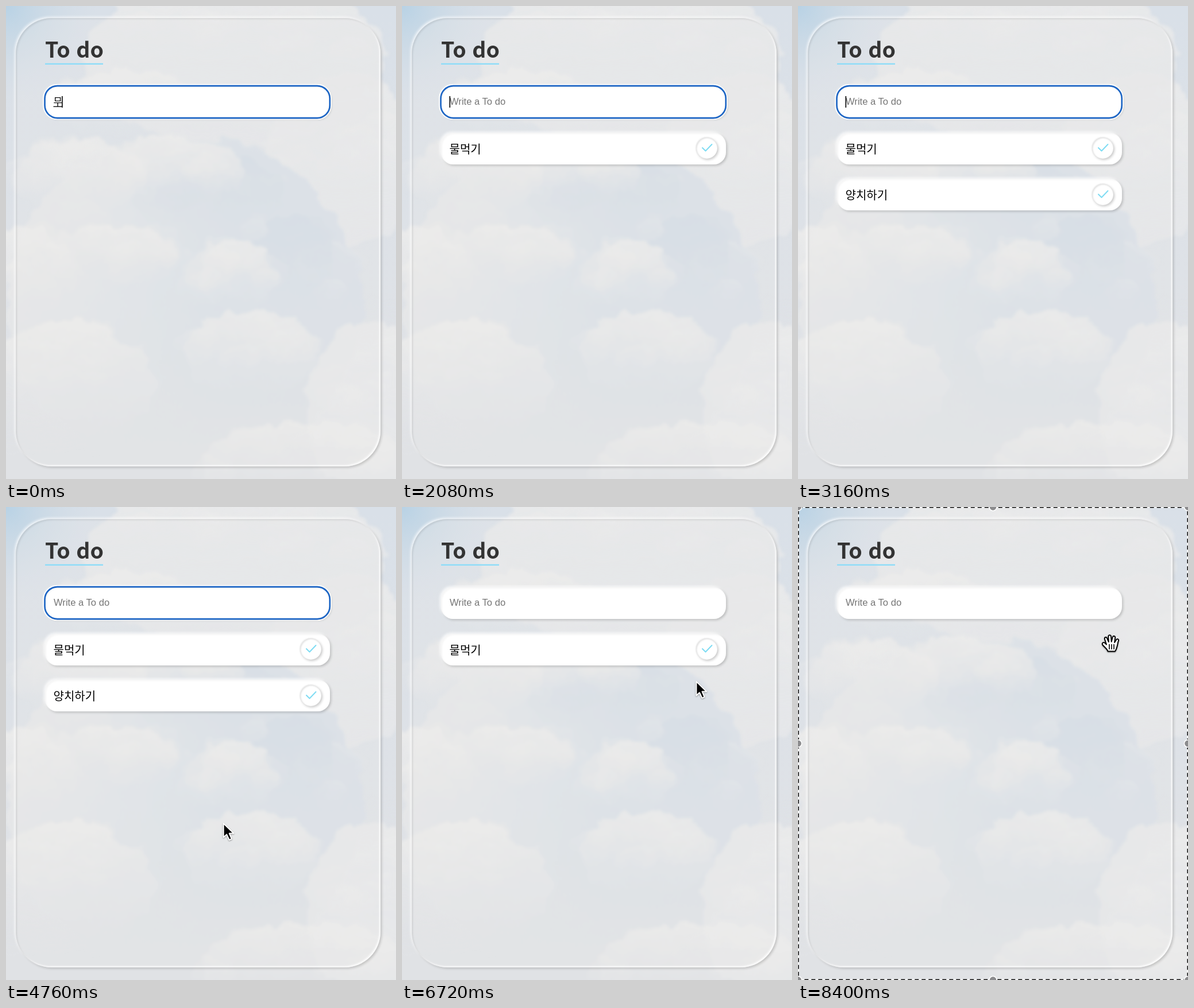
An HTML page that plays this animation: 679x824 px, repeating every 8590 ms.

```html
<!DOCTYPE html>
<html lang="ko">
<head>
<meta charset="utf-8">
<title>To do</title>
<style>
html, body { margin: 0; width: 100%; height: 100%; overflow: hidden; background: #dfe3e8; }
#stage { position: absolute; left: 0; top: 0; width: 679px; height: 824px; overflow: hidden; }
#stage > svg { position: absolute; left: 0; top: 0; }
#sky { will-change: transform; }
.box { position: absolute; box-sizing: border-box; }
.card {
  left: 17px; top: 21px; width: 635px; height: 781px; border-radius: 62px;
  background: rgba(230, 230, 230, .3);
  box-shadow: -2px -2px 4px rgba(255,255,255,.75), 2px 2px 4px rgba(0,0,0,.2),
    inset 2px 2px 3px rgba(0,0,0,.09), inset -2px -2px 3px rgba(255,255,255,.85);
}
.field {
  left: 68px; width: 496px; height: 55px; border-radius: 21px; background: #fff;
  box-shadow: -2px -2px 4px rgba(255,255,255,.8), 2px 2px 4px rgba(0,0,0,.2),
    inset 2px 2px 3px rgba(0,0,0,.04);
}
.item { padding-left: 14.5px; font: 500 20px/55px "Noto Sans CJK KR", "Noto Sans CJK", sans-serif; color: #000; }
.done {
  left: 444px; top: 8.5px; width: 37px; height: 37px; border-radius: 50%; background: #fff;
  box-shadow: 2px 2px 4px rgba(0,0,0,.22), -1px -1px 2px rgba(0,0,0,.06), inset 1px 1px 3px rgba(0,0,0,.14);
}
.done svg { position: absolute; left: 0; top: 0; stroke: #7fdcf3; }
.done.hover {
  left: 442px; top: 6.5px; width: 41px; height: 41px; background: #4bb9ec;
  box-shadow: inset 2px 2px 5px rgba(0,40,80,.3), 1px 1px 2px rgba(0,0,0,.08);
}
.done.hover svg { left: 2px; top: 2px; stroke: #fff; }
.ko { font-family: "Noto Sans CJK KR", "Noto Sans CJK", sans-serif; }
.latin { font-family: "Liberation Sans", Arial, sans-serif; }
</style>
</head>
<body>
<div id="stage">
  <svg id="sky" width="679" height="824">
    <defs>
      <filter id="puffy" filterUnits="userSpaceOnUse" x="-40" y="-40" width="760" height="910" color-interpolation-filters="sRGB">
        <feTurbulence type="fractalNoise" baseFrequency=".028" numOctaves="4" seed="8" result="n"/>
        <feDisplacementMap in="SourceGraphic" in2="n" scale="34" xChannelSelector="R" yChannelSelector="G"/>
        <feGaussianBlur stdDeviation="2.4"/>
      </filter>
      <linearGradient id="air" x2="0" y2="1">
        <stop offset="0" stop-color="#d9e0e8"/><stop offset="1" stop-color="#e2e3e6"/>
      </linearGradient>
      <radialGradient id="blue" gradientUnits="userSpaceOnUse" cx="0" cy="0" r="170">
        <stop offset="0" stop-color="#b8d2e5"/><stop offset=".4" stop-color="#c5d7e5" stop-opacity=".65"/>
        <stop offset="1" stop-color="#d6dfe8" stop-opacity="0"/>
      </radialGradient>
      <linearGradient id="lit" x2="0" y2="1">
        <stop offset="0" stop-color="#efeeec" stop-opacity=".8"/><stop offset="1" stop-color="#e6e7e9" stop-opacity="0"/>
      </linearGradient>
      <linearGradient id="full" x2="0" y2="1">
        <stop offset="0" stop-color="#e8e9ea"/><stop offset="1" stop-color="#e7e8ea" stop-opacity=".75"/>
      </linearGradient>
      <linearGradient id="shade" x2="0" y2="1">
        <stop offset="0" stop-color="#cfd9e4" stop-opacity=".75"/><stop offset="1" stop-color="#d5dde6" stop-opacity="0"/>
      </linearGradient>
      <linearGradient id="dome" x2="1" y2=".1">
        <stop offset="0" stop-color="#e8e8e8"/><stop offset=".35" stop-color="#e0e4e8"/>
        <stop offset=".65" stop-color="#d7dfe7"/><stop offset="1" stop-color="#d7dee7"/>
      </linearGradient>
      <linearGradient id="haze" x2="0" y2="1">
        <stop offset="0" stop-color="#dde1e6" stop-opacity="0"/><stop offset=".7" stop-color="#e0e2e5"/>
      </linearGradient>
    </defs>
    <rect width="679" height="824" fill="url(#air)"/>
    <rect width="300" height="300" fill="url(#blue)"/>
    <g id="clouds" filter="url(#puffy)"></g>
  </svg>

  <div class="box card"></div>
  <div class="box field" style="top:140px"></div>

  <svg id="ui" width="679" height="824">
    <text class="ko" x="68" y="89.7" font-size="37.5" font-weight="700" fill="#333">To do</text>
    <rect x="68" y="99.7" width="101" height="2.4" fill="#8ddcf8"/>
    <g id="ring" fill="none">
      <rect x="65.3" y="136.9" width="500.6" height="60.4" rx="24" stroke="#fff" stroke-opacity=".85" stroke-width="2"/>
      <rect x="67.5" y="139.1" width="496.3" height="56" rx="22" stroke="#1b64c4" stroke-width="2.6"/>
    </g>
    <text id="hint" class="latin" x="83" y="172.3" font-size="16.6" fill="#757575">Write a To do</text>
    <text id="typed" class="ko" x="82.5" y="173" font-size="16.67"></text>
    <rect id="compose" y="174.6" width="15.3" height="1.3"/>
    <rect id="caret" y="157" width="1.6" height="20"/>

    <g id="popup" style="filter:drop-shadow(0 1px 2px rgba(0,0,0,.4))">
      <path d="M273 213 287 198.500Q289.500 195.500 292 198.500L306 213Z" fill="#282c2f"/>
      <rect x="251" y="212" width="460" height="349.500" rx="7" fill="#282c2f"/>
      <g id="options" class="ko" font-size="22.75" font-weight="500" fill="#f2f2f2"></g>
    </g>

    <g id="select">
      <rect x=".75" y=".75" width="677.5" height="822.5" fill="none" stroke="#fff" stroke-width="1.5"/>
      <rect x=".75" y=".75" width="677.5" height="822.5" fill="none" stroke="#111" stroke-width="1.5" stroke-dasharray="7 5"/>
      <g id="grips" fill="#8b8b8d" stroke="#fff" stroke-width="1.5"></g>
    </g>

    <g id="cursor" style="filter:drop-shadow(0 1px 1.2px rgba(0,0,0,.4))" stroke-linejoin="round" stroke-linecap="round">
      <path id="arrow" d="M.8 1.500V25.800L6.300 20.600 10.800 30.200 15 28.400 10.900 18.800H18.600Z" fill="#000" stroke="#fff" stroke-width="2"/>
      <g id="point" fill="#fff" stroke="#000" stroke-width="1.9">
        <path d="M-2.500 2C-3-1.500 1.500-2 2.600 1L6.500 10.500C7 8.500 10.500 8.500 11.300 11.200 12.500 9 15.300 9.800 16 12.300 18 11 20 13 20 15.500 20.600 21 18.500 23.500 17.300 28.500H6.500C5 24.500-1 21.500-5.500 17.300-8.500 14-4.500 11.800-1.500 14L2.700 17Z"/>
        <path d="M8.500 16.500 9.500 23M12.200 16.500 12.700 23M16 16.300 15.800 22.800" fill="none" stroke-width="1.6"/>
      </g>
      <g id="grab" fill="#fff" stroke="#000" stroke-width="1.9">
        <path d="M-4 14C-5 10-9.500 7-13 3-15.500-.5-11.500-3-8.500 0L-6.500 2-9.500-7C-10.500-11-6.500-12-5.300-8.500L-2.600-2.500-3.200-11.500C-3-15.300 1.200-15.300 1.500-11.500L2.200-2.800 4.200-10.500C5.300-14 9-13 8.600-9.500L7.600-1.500 10.500-6C12.500-9 15.500-7 14.300-4 12.500 1 13 7 8.500 14Z"/>
        <path d="M-1.500 2V10M2.500 2V10M6.500 2V10" fill="none" stroke-width="1.6"/>
      </g>
    </g>
  </svg>
</div>
<script>
const LOOP = 8590, STEP = 40, CHAR = 15.33, BLINK = 501;
const BLUR = 6160, SELECT = 8320, GRAB = 8400;
const $ = id => document.getElementById(id);
const show = (el, on) => { el.style.display = on ? '' : 'none'; };
const mix = (a, b, k) => a + (b - a) * k;

let seed = 7;
const rand = () => (seed = seed * 16807 % 2147483647) / 2147483647;
const oval = (fill, cx, cy, rx, ry, opacity = 1) =>
  `<ellipse cx="${cx}" cy="${cy}" rx="${rx}" ry="${ry}" fill="url(#${fill})" opacity="${opacity}"/>`;

// An oval body with small lit puffs scattered over its upper part
function cloud(fill, cx, cy, rx, ry) {
  let out = oval(fill, cx, cy, rx, ry);
  for (let i = 0; i < 14; i++) {
    const a = Math.PI * (1 + rand()), d = Math.sqrt(rand()) * .95, r = 12 + rand() * 28;
    out += oval(fill === 'shade' ? 'shade' : 'lit',
      cx + Math.cos(a) * rx * d, cy + Math.sin(a) * ry * d + r * .6, r * 1.3, r, .4);
  }
  return out;
}

$('clouds').innerHTML =
  cloud('full', 400, 95, 265, 150) + cloud('lit', 210, 170, 130, 60) + cloud('full', 590, 270, 140, 150) +
  cloud('dome', 310, 520, 310, 295) + cloud('shade', 500, 450, 70, 85) + cloud('shade', 350, 330, 130, 80) +
  cloud('lit', 130, 300, 115, 70) + cloud('lit', 300, 285, 115, 60) +
  cloud('lit', 185, 435, 115, 55) + cloud('lit', 30, 460, 90, 75) +
  '<rect x="-40" y="500" width="760" height="400" fill="url(#haze)"/>' +
  cloud('lit', 400, 470, 66, 65) + cloud('lit', 425, 605, 115, 75) +
  cloud('full', 640, 700, 120, 150) + cloud('lit', 520, 800, 180, 75) + cloud('lit', 110, 660, 150, 110);

$('options').innerHTML = ['ㅇ', 'ㅇ.', 'ㅇㅀ', 'ㅇ'.repeat(10), 'ㅇ'.repeat(21)]
  .map((s, i) => `<text x="273.6" y="${262 + i * 66.9}">${s}</text>`).join('');

for (let i = 0; i < 9; i++)
  if (i !== 4) $('grips').innerHTML += `<circle cx="${i % 3 * 339.5}" cy="${Math.floor(i / 3) * 412}" r="6.5"/>`;

// Keystrokes are evenly spaced between start and end
const tasks = [
  { keys: '무 물 묾 물머 물먹 물먹ㄱ 물먹기', start: 0, end: 600, added: 960, removed: 7520 },
  { keys: 'ㅇ 야 양 양ㅊ 양치 양칳 양치하 양치학 양치하기', start: 2400, end: 3000, added: 3160, removed: 6240 },
];
tasks.forEach((task, i) => {
  task.keys = task.keys.split(' ');
  task.y = 220.5 + i * 80.5;
  task.el = document.createElement('div');
  task.el.className = 'box field item';
  task.el.style.top = task.y + 'px';
  task.el.textContent = task.keys[task.keys.length - 1];
  task.button = document.createElement('div');
  task.button.className = 'box done';
  task.button.innerHTML = '<svg width="37" height="37" fill="none" stroke-width="2" stroke-linecap="round" stroke-linejoin="round"><path d="M11 18 16.500 23.500 27.500 12"/></svg>';
  task.el.append(task.button);
  $('stage').insertBefore(task.el, $('ui'));
});

function textAt(t) {
  const task = tasks.find(k => t >= k.start && t < k.added);
  if (!task) return '';
  const last = task.keys.length - 1;
  const n = Math.floor((t - task.start) / (task.end - task.start) * last);
  return task.keys[Math.min(n, last)];
}

function caretOn(t) {
  if (t >= BLUR) return false;
  if (textAt(t)) return true;
  const since = t - Math.max(...tasks.map(k => k.added).filter(a => a <= t));
  return Math.floor((since + 23) / BLINK) % 2 === 0;
}

// Each move bends from one resting point towards the next
const MOVES = [
  { start: 4520, end: 4840, from: [325, 830], bend: [370, 600], to: [383, 519] },
  { start: 5040, end: 5640, from: [383, 519], bend: [525, 385], to: [527, 327] },
  { start: 6680, end: 7200, from: [527, 327], bend: [440, 195], to: [541, 237] },
];
function pointerAt(t) {
  const m = MOVES.filter(k => k.start < t).pop();
  if (!m) return null;
  const k = 1 - (1 - Math.min(1, (t - m.start) / (m.end - m.start))) ** 1.3;
  return [0, 1].map(i => mix(mix(m.from[i], m.bend[i], k), mix(m.bend[i], m.to[i], k), k));
}

function render(t) {
  const text = textAt(t), x = 82.5 + text.length * CHAR;
  show($('ring'), t < BLUR);
  show($('hint'), !text);
  $('typed').textContent = text;
  show($('compose'), text);
  $('compose').setAttribute('x', x - CHAR);
  show($('caret'), caretOn(t));
  $('caret').setAttribute('x', text ? x - .8 : x);
  show($('popup'), text === 'ㅇ');

  const tip = pointerAt(t), grab = t >= GRAB;
  let hovering = false;
  for (const task of tasks) {
    const alive = t >= task.added && t < task.removed;
    const over = alive && !!tip && Math.hypot(tip[0] - 530.5, tip[1] - task.y - 27) < 18.5;
    show(task.el, alive);
    task.button.classList.toggle('hover', over);
    hovering = hovering || over;
  }

  show($('select'), t >= SELECT);
  show($('cursor'), tip);
  if (!tip) return;
  $('cursor').setAttribute('transform', grab ? 'translate(543.5 237.5)' : `translate(${tip})`);
  show($('grab'), grab);
  show($('point'), hovering && !grab);
  show($('arrow'), !hovering && !grab);
}

const began = performance.now();
let last = -1;
function tick() {
  const t = Math.floor(((performance.now() - began) % LOOP) / STEP) * STEP;
  if (t !== last) render(last = t);
  requestAnimationFrame(tick);
}
tick();
</script>
</body>
</html>
```
